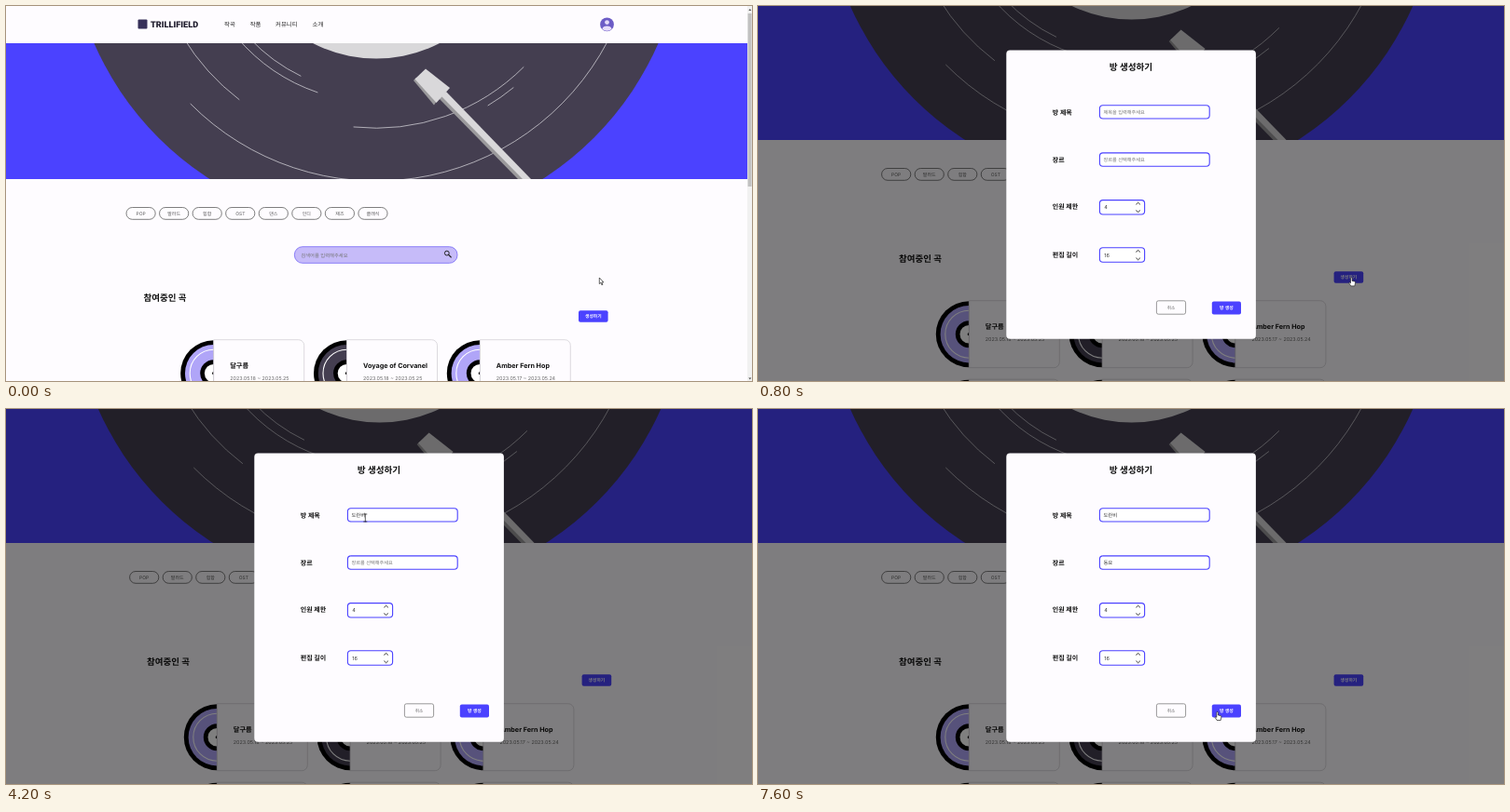
These frames come from a looping animation (800 px wide and 403 px high, 8 s). An HTML page:

```html
<!DOCTYPE html>
<html lang="ko">
<head>
<meta charset="utf-8">
<title>Create a room</title>
<style>
  html, body { margin: 0; width: 100%; height: 100%; overflow: hidden; background: #fefcff; }
  svg { display: block; width: 100%; height: 100%; }
  text { font-family: Inter, "Noto Sans CJK KR", "Noto Sans CJK", sans-serif; text-rendering: geometricPrecision; white-space: pre; }
</style>
</head>
<body>
<svg id="stage" viewBox="0 0 800 403"></svg>
<script>
const LOOP = 8000, STEP = 100, SCROLL = 42, MODAL_AT = 800;
const BLUE = '#4b42ff', DARK = '#443e50', INK = '#111', GREY = '#757575', PAPER = '#fefcff';

const text = (s, x, y, size, fill = INK, weight = 400, extra = '') =>
  `<text x="${x}" y="${y}" font-size="${size}" fill="${fill}" font-weight="${weight}" ${extra}>${s}</text>`;
const label = (s, x, y, size, fill, weight) => text(s, x, y, size, fill, weight, 'text-anchor="middle"');
const rect = (x, y, w, h, fill, rx = 0, stroke = 'none', sw = 0) =>
  `<rect x="${x}" y="${y}" width="${w}" height="${h}" rx="${rx}" fill="${fill}" stroke="${stroke}" stroke-width="${sw}"/>`;
const circle = (x, y, r, fill, extra = '') => `<circle cx="${x}" cy="${y}" r="${r}" fill="${fill}" ${extra}/>`;
const poly = (points, fill) => `<polygon points="${points}" fill="${fill}"/>`;
const line = (d, color, w) =>
  `<path d="${d}" fill="none" stroke="${color}" stroke-width="${w}" stroke-linecap="round" stroke-linejoin="round"/>`;

function header() {
  const nav = [['작곡', 234], ['작품', 261.7], ['커뮤니티', 289], ['소개', 328.5]];
  return rect(141.5, 14.5, 10, 10, '#37315a', 1) +
    text('TRILLIFIELD', 155, 22.8, 9.2, '#1d1a2b', 900, 'style="font-family:Roboto,sans-serif"') +
    nav.map(([s, x]) => text(s, x, 22.2, 6.4, '#222')).join('') +
    circle(644.5, 19.8, 7.4, '#6c5cc6') +
    circle(644.5, 17.6, 2.4, '#e6dcfa') +
    '<path d="M639.4 24.8a5.2 4 0 0 1 10.2 0a7.4 7.4 0 0 1-10.2 0Z" fill="#e6dcfa"/>';
}

function banner() {
  const cx = 397, cy = -91.7;
  const groove = (r, x1, x2) => {
    const at = x => `${x} ${cy + Math.sqrt(r * r - (x - cx) ** 2)}`;
    return line(`M${at(x1)}A${r} ${r} 0 0 0 ${at(x2)}`, '#d6d4da', 0.75);
  };
  return rect(-4, 40, 803, 146, BLUE) + '<g clip-path="url(#banner)">' +
    circle(cx, cy, 330, DARK) + circle(cx, cy, 148.2, '#d9d8da') +
    groove(223, 373, 555) + groove(280, 198, 645) + groove(242, 190, 250) +
    groove(195, 248, 334) + groove(185.5, 262, 316) + groove(232, 517, 544) +
    poly('463,98 468,94 557,186 549,186', '#9b9a9c') +
    poly('466,96 472,92 563,186 554,186', '#d9d8da') +
    poly('437,80 440,77 462,102 459,106.5', '#9b9a9c') +
    poly('450,67.5 476,88 461.5,104 438.5,78.5', '#d9d8da') + '</g>';
}

function tools() {
  const genres = ['POP', '발라드', '힙합', 'OST', '댄스', '인디', '재즈', '클래식'];
  return genres.map((s, i) => {
    const x = 129 + i * 35.55;
    return rect(x, 216.5, 31.2, 12.8, 'none', 6.4, '#555', 0.75) + label(s, x + 15.6, 224.7, 5, '#555');
  }).join('') +
    rect(309.4, 258.7, 174.6, 17.6, '#c6bbf9', 8.5, '#7466f6', 0.8) +
    text('검색어를 입력해주세요', 316.3, 269.5, 5.3, GREY) +
    circle(472.8, 265.6, 2.4, 'none', 'stroke="#222" stroke-width="1"') +
    line('M474.7 267.5L477.3 270', '#222', 1.1) +
    text('참여중인 곡', 147.5, 317.4, 9.5, INK, 700) +
    rect(614, 327.3, 31.6, 12.5, BLUE, 2) + label('생성하기', 629.8, 335.4, 4.8, '#fff', 700);
}

function card(x, y, color, name, date) {
  const disc = circle(0, 36, 35.5, '#000') + circle(0, 36, 30.7, color) +
    circle(0, 36, 25.5, 'none', 'stroke="#fff" stroke-width="1.1"') +
    circle(0, 36, 14.5, '#000') + circle(0, 36, 9.8, '#fff') + circle(0, 36, 1.6, '#000');
  return `<g transform="translate(${x} ${y})"><g clip-path="url(#half)">${disc}</g>` +
    `<path d="M0 0H91a6 6 0 0 1 6 6V66a6 6 0 0 1-6 6H0Z" fill="${PAPER}" stroke="#d3d1d6" stroke-width=".8"/>` +
    text(name, 17.5, 30, 7.2, INK, 700) + text(date, 17.5, 43.5, 5.4, '#666') + '</g>';
}

function cards() {
  const lilac = '#b0a5f8';
  const songs = [
    [lilac, '달구름', '2023.05.18 ~ 2023.05.25'],
    [DARK, 'Voyage of Corvanel', '2023.05.18 ~ 2023.05.25'],
    [lilac, 'Amber Fern Hop', '2023.05.17 ~ 2023.05.24']
  ];
  const row = y => songs.map((s, i) => card(222.7 + i * 142.8, y, ...s)).join('');
  return row(358.7) + row(443.2);
}

function scrollbar() {
  return rect(795, 0, 5, 403, '#f1f1f1') +
    `<rect id="thumb" x="795.6" y="8" width="4" height="186" fill="#c1c1c1"/>` +
    poly('796.3,5 799.3,5 797.8,3', '#505050') + poly('796.3,399.5 799.3,399.5 797.8,401.5', '#505050');
}

function modal() {
  const field = (name, y, w, h) => text(name, 315.8, y + 9.8, 7, INK, 700) +
    rect(366.4, y, w, h, '#fff', 3.5, BLUE, 1.1);
  const spin = y => line(`M405.7 ${y + 4.4}l1.9-1.8l1.9 1.8M405.7 ${y + 11.2}l1.9 1.8l1.9-1.8`, '#222', 0.95);
  return rect(-5, -5, 810, 413, 'rgba(0,0,0,.5)') + rect(266.3, 47.6, 267.6, 310.2, PAPER, 4) +
    label('방 생성하기', 400, 69.4, 9.6, INK, 700) +
    field('방 제목', 106.7, 117.8, 14.3) + field('장르', 157.9, 117.8, 14.3) +
    field('인원 제한', 208.6, 48.2, 15.4) + spin(208.6) +
    field('편집 길이', 259.8, 48.2, 15.4) + spin(259.8) +
    `<g id="title"></g><g id="genre"></g><g id="limit"></g>` + text('16', 371.2, 269.8, 5.5, '#333') +
    rect(427.4, 316.8, 31.2, 14.4, 'none', 2, '#777', 0.75) + label('취소', 443, 325.7, 4.7, '#666') +
    rect(486.8, 317.6, 31.2, 13.8, BLUE, 2) + label('방 생성', 502.4, 326.2, 4.9, '#fff', 700);
}

const outline = 'fill="#fff" stroke="#222" stroke-width=".7" stroke-linejoin="round"';
const pointers = {
  arrow: `<path d="M0 0V6.6L1.5 5.3L2.6 7.8L3.6 7.4L2.5 4.9H4.6Z" ${outline}/>`,
  hand: `<path d="M-.8 .6a.8.8 0 0 1 1.6 0V3.4L3.6 4Q4.4 4.3 4.3 5.3L3.6 8.9H-.5L-2.4 6Q-2.6 5-1.6 5.1L-.8 5.8Z" ${outline}/>`,
  beam: line('M-1.6-4H1.6M0-4V4M-1.6 4H1.6', '#222', 0.75)
};

const stage = document.getElementById('stage');
stage.innerHTML = `<defs>
  <clipPath id="banner"><rect x="-4" y="40" width="803" height="146"/></clipPath>
  <clipPath id="half"><rect x="-40" y="-2" width="40" height="80"/></clipPath></defs>` +
  rect(-5, -5, 810, 413, PAPER) +
  `<g id="page">${header()}${banner()}${tools()}${cards()}</g>
   <g id="bar">${scrollbar()}</g><g id="modal">${modal()}</g><g id="pointer"></g>`;
const el = id => document.getElementById(id);

// [time, settled text, syllable being composed]
const titleKeys = [[2300, '', 'ㄷ'], [2400, '', '도'], [2500, '', '돌'], [2600, '도', '라'],
  [2800, '도', '란'], [3000, '도란', 'ㅂ'], [3100, '도란', '비'], [3700, '도란비', '']];
const genreKeys = [[4300, '', 'ㄷ'], [4400, '', '도'], [4500, '', '동'],
  [4700, '동', 'ㅇ'], [4900, '동', '요'], [5200, '동요', '']];

function typed(keys, t, hint, y) {
  const key = keys.filter(k => k[0] <= t).pop();
  return key
    ? text(`${key[1]}<tspan text-decoration="underline">${key[2]}</tspan>`, 370.4, y, 5.4, '#333')
    : text(hint, 370.4, y, 5.2, GREY);
}

const progress = (t, a, b) => Math.min(1, Math.max(0, (t - a) / (b - a)));
const smooth = p => p * p * (3 - 2 * p);
const mix = (a, b, p) => a + (b - a) * p;

function pointerAt(t) {
  if (t < 5900) {
    const p = smooth(progress(t, 1000, 1900));
    return [mix(636.3, 385.3, p), mix(292, 117, p)];
  }
  if (t < 6900) {
    const p = smooth(progress(t, 5900, 6600));
    const bend = (a, b, c) => mix(mix(a, b, p), mix(b, c, p), p);
    return [bend(385.3, 560, 394.6), bend(117, 195, 273)];
  }
  const p = smooth(progress(t, 6900, 7600));
  return [mix(394.6, 492.6, p), mix(273, 325.6, p)];
}

function pointerKind(t, x, y) {
  if (t < 900) return t >= 500 ? 'hand' : 'arrow';
  const inside = (l, top, r, b) => x > l && x < r && y > top && y < b;
  if (inside(487, 317, 518, 332)) return 'hand';
  const overField = inside(366, 106, 485, 122) || inside(366, 157, 485, 173) ||
    inside(366, 208, 403, 224) || inside(366, 259, 403, 276);
  return overField ? 'beam' : 'arrow';
}

function draw(ms) {
  const t = Math.floor(ms / STEP) * STEP;
  const open = t >= MODAL_AT;
  const scroll = SCROLL * (1 - (1 - progress(t, 0, 700)) ** 2.24);
  el('page').setAttribute('transform', `translate(${open ? 3.6 : 0} ${-scroll})`);
  el('thumb').setAttribute('y', 8 + scroll * 0.44);
  el('bar').style.display = open ? 'none' : '';
  el('modal').style.display = open ? '' : 'none';

  el('title').innerHTML = typed(titleKeys, t, '제목을 입력해주세요', 115.6);
  el('genre').innerHTML = typed(genreKeys, t, '장르를 선택해주세요', 166.9);
  const picked = t >= 5200 && t < 6600;
  el('limit').innerHTML = (picked ? rect(371, 212.3, 4.2, 7.8, '#4a50e8') : '') +
    text('4', 371.2, 218.3, 5.5, picked ? '#fff' : '#333');

  const [x, y] = pointerAt(t);
  el('pointer').innerHTML = pointers[pointerKind(t, x, y)];
  el('pointer').setAttribute('transform', `translate(${x} ${y})`);
}

const start = performance.now();
function tick() {
  draw((performance.now() - start) % LOOP);
  requestAnimationFrame(tick);
}
tick();
</script>
</body>
</html>
```
